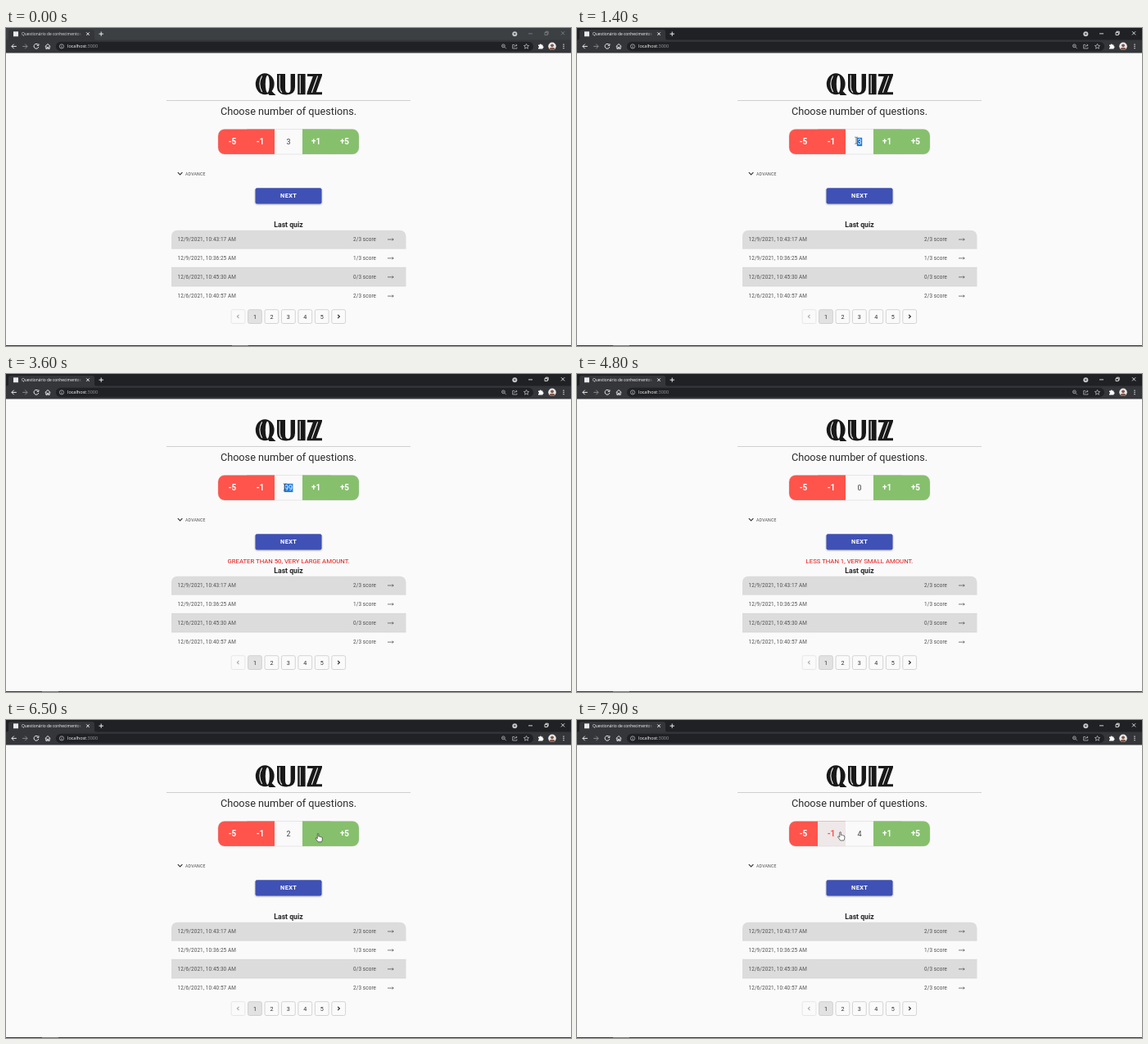
Animation, 690 px wide and 388 px high, one loop 8 s. Source, as an HTML page:

```html
<!DOCTYPE html>
<html lang="en">
<head>
<meta charset="utf-8">
<title>Quiz</title>
<style>
  html, body { margin: 0; width: 100%; height: 100%; overflow: hidden; background: #fafafa; }
  svg { display: block; width: 690px; height: 388px; }
  text { font-family: Roboto, Arial, sans-serif; white-space: pre; }
  .ui { font-family: "Open Sans", "Noto Sans", sans-serif; }
  .mid { text-anchor: middle; }
  .icon { fill: none; stroke: #e8eaed; stroke-width: 1; }
  .dim { stroke: #b4b6b9; stroke-width: .8; }
  .row { font-size: 6.4px; letter-spacing: .1px; fill: #505050; }
  .step { font-size: 10px; font-weight: 700; text-anchor: middle; fill: #fff; }
</style>
</head>
<body>
<svg id="stage" viewBox="0 0 690 388" xmlns="http://www.w3.org/2000/svg">
  <defs>
    <clipPath id="pill"><rect x="259" y="123.5" width="172" height="30.5" rx="8"/></clipPath>
    <clipPath id="face"><circle cx="667" cy="22.3" r="4.8"/></clipPath>
    <linearGradient id="fade" x1="0" x2="1"><stop stop-color="#35363a" stop-opacity="0"/><stop offset="1" stop-color="#35363a"/></linearGradient>
    <filter id="soft" x="-10%" y="-30%" width="120%" height="180%"><feGaussianBlur stdDeviation=".9"/></filter>
  </defs>

  <rect width="690" height="388" fill="#fafafa"/>

  <!-- browser bar -->
  <g>
    <rect id="strip" width="690" height="15"/>
    <path d="M0 15Q3 15 3 12V5Q3 2 6 2H105Q108 2 108 5V12Q108 15 111 15Z" fill="#35363a"/>
    <rect y="14.5" width="690" height="16" fill="#35363a"/>
    <rect x="61" y="16.8" width="583" height="11.4" rx="5.7" fill="#202124"/>
    <rect x="9" y="4.3" width="6" height="6" fill="#e8eaed"/>
    <text id="tab" class="ui" x="19" y="9.1" font-size="4.9">Questionário de conhecimentos</text>
    <rect x="86" y="3" width="7" height="9" fill="url(#fade)"/>
    <path class="icon" d="M98.2 5.4l3.6 3.6m0-3.6l-3.6 3.6M113.5 7.2h5.4m-2.7-2.7v5.4"/>
    <path class="icon" d="M12.8 22.4H7m2.7-2.8L6.9 22.4l2.8 2.8"/>
    <path class="icon" style="stroke:#85878a" d="M20.2 22.4H26m-2.7-2.8l2.8 2.8-2.8 2.8"/>
    <path class="icon" d="M39.2 20.4A2.9 2.9 0 1 0 39.8 23M39.9 19.3V21.4H37.7"/>
    <path class="icon" d="M47.7 22.6L51 19.5l3.3 3.1M48.9 22v3.4h1.4v-2h1.4v2h1.4V22"/>
    <circle class="icon dim" cx="68" cy="22.4" r="2.6"/>
    <path class="icon dim" d="M68 20.8v.7m0 .6v1.9"/>
    <text class="ui" x="75" y="24.4" font-size="5.5" fill="#fff">localhost<tspan fill="#9aa0a6">:3000</tspan></text>
    <circle class="icon dim" cx="607.4" cy="21.8" r="1.9"/>
    <path class="icon dim" d="M608.8 23.2l2 2M606.5 21.8h1.8"/>
    <path class="icon dim" d="M621 20.4h-2.3v4.6h5.2v-1.4M620.4 23.4q.3-2.4 3.6-2.4m-1.2-1.3l1.3 1.3-1.3 1.3"/>
    <path class="icon dim" d="M635.5 19.3l.9 2 2.2.2-1.7 1.5.5 2.2-1.9-1.2-1.9 1.2.5-2.2-1.7-1.5 2.2-.2z"/>
    <path fill="#fff" d="M650 20.6h1.7a1.1 1.1 0 0 1 2.2 0h1.6v1.6a1.1 1.1 0 0 1 0 2.2V25.6H650V24a1 1 0 0 0 0-2z"/>
    <g clip-path="url(#face)">
      <rect x="662" y="17" width="10" height="11" fill="#e9e6e6"/>
      <circle cx="667" cy="21.3" r="1.9" fill="#80574b"/>
      <ellipse cx="667" cy="27" rx="3.8" ry="3.3" fill="#80574b"/>
    </g>
    <path stroke="#e8eaed" stroke-width="1.2" d="M681 19.5v1.2m0 1.1v1.2m0 1.1v1.2"/>
    <circle cx="621.3" cy="7.2" r="3" fill="#c4c6c9"/>
    <path d="M619.9 6.6h2.8l-1.4 1.8z" fill="#202124"/>
    <path id="controls" fill="none" stroke-width=".8" d="M638 6.9h5M658 5.4h3.2v3.2H658zM659 5.2v-1h3.2v3.2h-1M678 4.2l4.2 4.2m0-4.2L678 8.4"/>
  </g>

  <!-- heading -->
  <g fill="#191919">
    <ellipse cx="316.2" cy="68.3" rx="11.4" ry="13"/>
    <path d="M316 73.5H321L329.5 82H321.5Z"/>
    <path d="M331 56H341V74Q341 79 344.3 79 347.6 79 347.6 74V56H353V72Q353 81.4 342.5 81.4 331 81.4 331 71Z"/>
    <path d="M356.2 56H365.6V81.2H356.2Z"/>
    <path d="M368 56H386V58L378.8 78.2H386V81.2H367.5V79.2L374.8 59H368Z"/>
    <ellipse cx="319.3" cy="68.3" rx="2.5" ry="10.6" fill="#fafafa"/>
    <path d="M312.6 58.5Q307 68.3 312.6 78M334.2 57.5V72Q334.4 76.5 337 78.6M359.2 57.5V79.7M380.6 58.5L373.4 78.7" fill="none" stroke="#fafafa" stroke-width="1.1"/>
  </g>
  <rect x="196" y="88" width="298" height="1" fill="#cfcfcf"/>
  <text class="mid" x="345" y="106" font-size="12.7" fill="#2c2c2c">Choose number of questions.</text>

  <!-- counter -->
  <g clip-path="url(#pill)">
    <rect x="259" y="123" width="69" height="32" fill="#ff544b"/>
    <rect x="362" y="123" width="69" height="32" fill="#86c06c"/>
    <rect id="minusBox" x="294" y="123" width="34" height="32"/>
    <rect id="plusBox" x="362" y="123" width="34.3" height="32"/>
    <rect x="328" y="123" width="34" height="32" fill="#fafafa"/>
  </g>
  <rect x="259" y="123.5" width="172" height="30.5" rx="8" fill="none" stroke="#bbb" stroke-opacity=".4" stroke-width=".8"/>
  <text class="step" x="276.5" y="142">-5</text>
  <text class="step" id="minus" x="310.5" y="142">-1</text>
  <text class="step" id="plus" x="378.7" y="142">+1</text>
  <text class="step" x="413.5" y="142">+5</text>
  <rect id="mark" y="133.8" height="10.3" fill="#1e7be0"/>
  <text id="value" class="mid" x="345" y="142.2" font-size="9"></text>

  <path d="M209.8 176.2l2.8 2.8 2.8-2.8" fill="none" stroke="#333" stroke-width="1.1"/>
  <text x="219" y="179.7" font-size="5.2" letter-spacing=".2" fill="#4a4a4a">ADVANCE</text>

  <rect x="304.5" y="196.2" width="81" height="19" rx="2" fill="#000" opacity=".35" filter="url(#soft)"/>
  <rect x="304.5" y="195.2" width="81" height="19.4" rx="2" fill="#3f51b5"/>
  <text class="mid" x="345.2" y="207.4" font-size="7.4" font-weight="700" letter-spacing=".4" fill="#fff">NEXT</text>

  <text id="msg" class="mid" x="345" y="231" font-size="7.75" fill="#e60f0f"></text>
  <text class="mid" x="345" y="242.8" font-size="8.7" font-weight="700" fill="#262626">Last quiz</text>

  <path d="M202 269V254.5Q202 246.7 210 246.7H480Q488.5 246.7 488.5 254.5V269Z" fill="#dcdcdc"/>
  <rect x="202" y="292.3" width="286.5" height="22.7" fill="#dcdcdc"/>
  <path d="M202 269.2H488.5M202 292.3H488.5M202 315H488.5" stroke="#cecece" stroke-width=".7"/>
  <g id="rows"></g>
  <g id="pages"></g>

  <!-- taskbar edge -->
  <rect y="387" width="690" height="1" fill="#3a3a3a"/>
  <rect id="task" y="387" width="20" height="1" fill="#777"/>

  <!-- pointers -->
  <g id="arrow"><path d="M0 0V9.5L2.2 7.5 3.7 11 5.2 10.3 3.7 7H6.7Z" fill="#fff" stroke="#111" stroke-width=".7"/></g>
  <g id="beam"><path d="M-1.8-4.2Q0-4.2 0-3.2 0-4.2 1.8-4.2M0-3.2V3.2M-1.8 4.2Q0 4.2 0 3.2 0 4.2 1.8 4.2" fill="none" stroke="#333" stroke-width=".6"/></g>
  <g id="hand"><path d="M-2-4.6Q-1.2-5.6-.5-4.6V-1.2Q.5-1.8 1-.9 2-1.4 2.5-.5 3.8-.9 4 .5V2.2Q4 4 3 5.4H-1.2Q-2.4 3.6-4 1.5-4.5.3-3.3.2L-2 1.4Z" fill="#fff" stroke="#333" stroke-width=".7" stroke-linejoin="round"/></g>
</svg>
<script>
const LOOP = 8000, STEP = 100;
const $ = id => document.getElementById(id);

$("rows").innerHTML = [
  ["12/9/2021, 10:43:17 AM", 2, 259.6], ["12/9/2021, 10:36:25 AM", 1, 282.5],
  ["12/6/2021, 10:45:30 AM", 0, 305.5], ["12/6/2021, 10:40:57 AM", 2, 328.7]
].map(([date, score, y]) => `
  <text class="row" x="209.5" y="${y}">${date}</text>
  <text class="row" x="424" y="${y}">${score}/3 score</text>
  <path d="M466 ${y - 1.6}h7.2m-1.6-1.4l1.6 1.4-1.6 1.4" fill="none" stroke="#444" stroke-width=".7"/>`).join("");

$("pages").innerHTML = ["<", 1, 2, 3, 4, 5, ">"].map((label, i) => {
  const x = 283.5 + i * 20.45, dir = label === "<" ? -1 : 1;
  const face = typeof label === "number"
    ? `<text class="mid" x="${x}" y="354.6" font-size="7.2" fill="#333">${label}</text>`
    : `<path d="M${x - dir} 349.8l${2.2 * dir} 2.2 ${-2.2 * dir} 2.2" fill="none" stroke="${i ? "#222" : "#aaa"}" stroke-width="1.1"/>`;
  return `<rect x="${x - 8.4}" y="343.7" width="16.8" height="16.8" rx="2" fill="${label === 1 ? "#e2e2e2" : "none"}"
    stroke="${i ? "#c9c9c9" : "#e2e2e2"}" stroke-width=".8"/>${face}`;
}).join("");

const BIG = "GREATER THAN 50, VERY LARGE AMOUNT.";
const SMALL = "LESS THAN 1, VERY SMALL AMOUNT.";

// Every row: time, then the values held from that time on.
const values = [[0, "3"], [2400, "9"], [2500, "99"], [4700, "0"], [5900, "1"], [6500, "2"], [6900, "3"], [7500, "4"]];
const marks = [[0, 0], [1400, 6.4], [2400, 0], [3600, 10.8], [4700, 0]];
const notes = [[0, "", 0], [2500, BIG, .5], [2600, BIG, 1], [4700, SMALL, 1], [5900, "", 0]];
const pointers = [
  [0, ""], [1000, "arrow", 366, 160], [1100, "beam", 341, 137.2], [2400, ""],
  [3000, "beam", 352.5, 150], [3100, "beam", 352.5, 143], [3200, "beam", 352.5, 138],
  [3600, "beam", 340.5, 138], [4700, ""],
  [5200, "beam", 352, 143], [5300, "hand", 368, 146], [5400, "hand", 385, 146],
  [5500, "hand", 391.7, 144.8], [5600, "hand", 386, 144], [5700, "hand", 382.3, 143.4],
  [7600, "hand", 375, 143], [7700, "beam", 348, 142], [7800, "hand", 325, 142], [7900, "hand", 322.8, 141.6]
];
// Box and label blend from the filled look (0) to the hovered look (1).
const plusLook = [
  [0, 0, 0], [5300, .3, .3], [5400, .75, .75], [5500, 1, 1],
  [5900, 0, 1], [6000, .35, 1], [6100, .75, 1], [6200, 1, 1],
  [6500, 0, 1], [6600, .6, 1], [6700, 1, 1],
  [6900, 0, 1], [7000, .5, 1], [7100, 1, 1],
  [7500, 0, 1], [7600, .6, 1], [7700, .4, .4], [7800, .1, .1], [7900, 0, 0]
];
const minusLook = [[0, 0, 0], [7800, .5, .5], [7900, 1, 1]];

const at = (table, t) => table.findLast(row => row[0] <= t);
const mix = (a, b, k) => `rgb(${a.map((v, i) => Math.round(v + (b[i] - v) * k))})`;
const WHITE = [255, 255, 255], GREEN = [134, 192, 108], RED = [255, 84, 75];

function paintButton(name, look, base, hover) {
  $(name + "Box").style.fill = mix(base, hover, look[1]);
  $(name).style.fill = mix(WHITE, base, look[2]);
}

function pointerAt(t) {
  if (t < 100 || t > 900) return at(pointers, t);
  const k = (t - 100) / 800, e = k * k * (3 - 2 * k);
  return [t, "arrow", 662 - 272 * e, 19 + 173 * e];
}

function draw(t) {
  const active = t >= 1300;
  $("strip").style.fill = active ? "#202124" : "#3c4043";
  $("tab").style.fill = active ? "#fff" : "#e4e6e8";
  $("controls").style.stroke = active ? "#fff" : "#85878a";
  $("task").setAttribute("x", active ? 44 : 276);

  const width = at(marks, t)[1];
  $("mark").setAttribute("x", 345 - width / 2);
  $("mark").setAttribute("width", width);
  $("value").textContent = at(values, t)[1];
  $("value").style.fill = width ? "#fff" : "#444";

  const [, note, alpha] = at(notes, t);
  $("msg").textContent = note;
  $("msg").style.opacity = alpha;

  paintButton("plus", at(plusLook, t), GREEN, [234, 235, 234]);
  paintButton("minus", at(minusLook, t), RED, [239, 232, 232]);

  const [, kind, x, y] = pointerAt(t);
  for (const id of ["arrow", "beam", "hand"]) {
    $(id).style.display = id === kind ? "" : "none";
    if (id === kind) $(id).setAttribute("transform", `translate(${x} ${y})`);
  }
}

function tick() {
  draw(Math.floor(performance.now() % LOOP / STEP) * STEP);
  requestAnimationFrame(tick);
}
tick();
</script>
</body>
</html>
```
